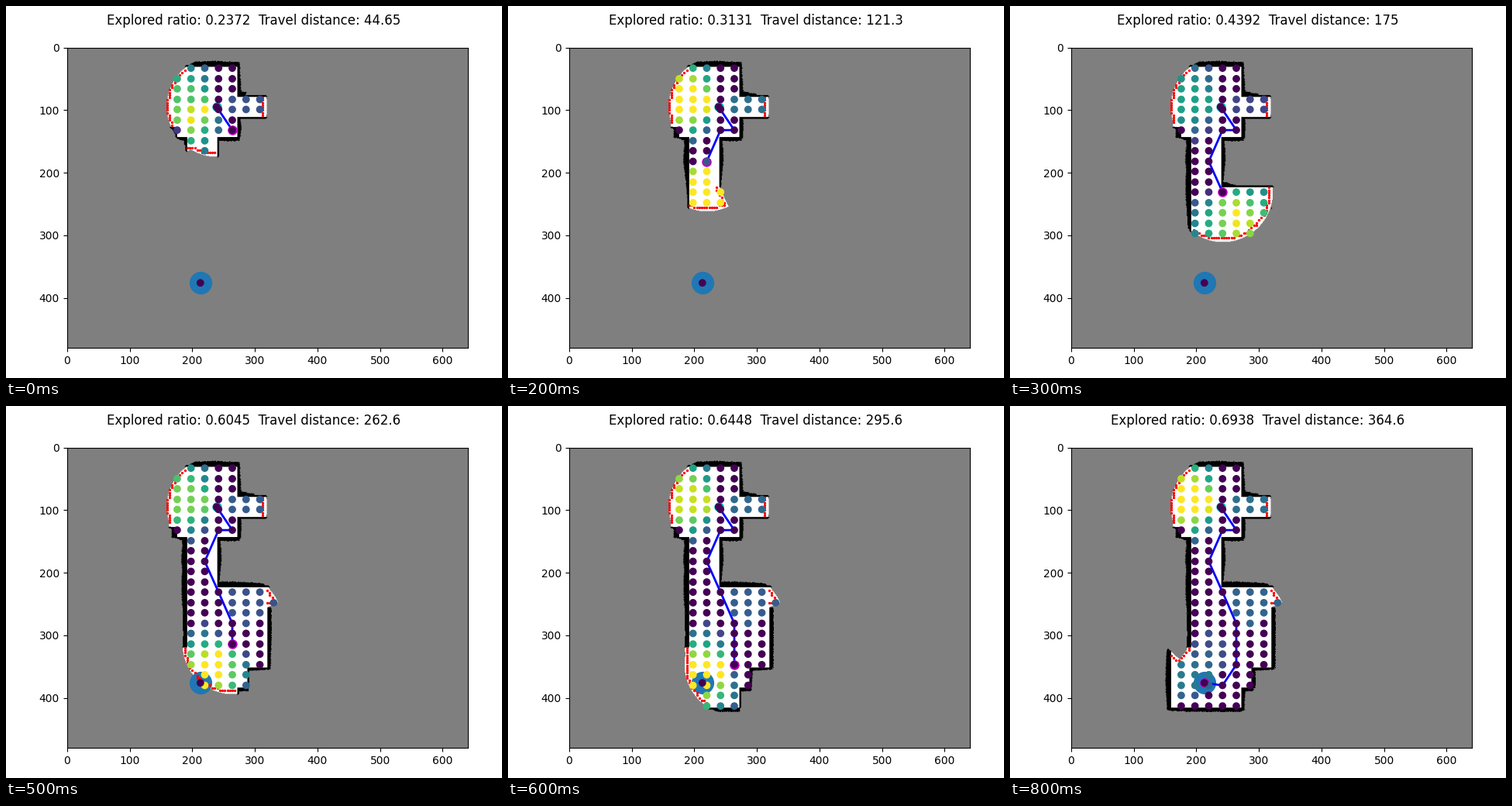
A matplotlib script that plays this animation: 640 by 480 pixels, repeating every 900 ms.

```python
import numpy as np
import matplotlib.pyplot as plt
from matplotlib.animation import FuncAnimation

W, H = 640, 480
UNKNOWN, FREE, WALL = 127, 255, 0
RANGE = 80           # sensor reach
SIGHT = 70           # reach when counting frontiers
MIN_UTILITY = 5      # fewer visible frontiers count as none
CELL = 4             # frontier grid size
TILE = 16            # floor plan grid size
START, GOAL = (239, 95), (213, 376)

# rooms as left, top, right, bottom in tiles
ROOMS = [(9, 2, 17, 8), (11, 2, 17, 9), (17, 5, 21, 7), (12, 9, 15, 14),
         (12, 14, 20, 22), (20, 14, 22, 16), (12, 22, 18, 24), (10, 20, 17, 26)]
# waypoints as column, row of the node grid
STOPS = [(5, 8), (4, 8), (3, 11), (4, 14), (5, 17), (5, 19), (5, 21), (4, 23)]
# explored ratio at some steps, the others follow the seen area
RATIOS = {0: 0.2372, 2: 0.3131, 3: 0.4392, 4: 0.5512, 6: 0.6448, 8: 0.6938}


def node(col, row):
    return 154 + 22 * col, int(16.5 * row + 0.5)


rng = np.random.default_rng(4)
yy, xx = np.mgrid[:H, :W]
floor = np.zeros((H, W), bool)
for x0, y0, x1, y1 in ROOMS:
    floor[y0 * TILE:y1 * TILE, x0 * TILE:x1 * TILE] = True

path = np.array([START] + [node(*s) for s in STOPS] + [GOAL])
nodes = np.array([node(c, r) for c in range(9) for r in range(2, 27)]
                 + [START, GOAL])


def grow(mask, n):
    for _ in range(n):
        out = mask.copy()
        out[1:] |= mask[:-1]
        out[:-1] |= mask[1:]
        out[:, 1:] |= mask[:, :-1]
        out[:, :-1] |= mask[:, 1:]
        mask = out
    return mask


def scan(belief, pos, blind=None):
    """Cast rays from pos and write what they reach into belief."""
    n = 1440
    ang = np.arange(n) * 2 * np.pi / n
    cos, sin = np.cos(ang), np.sin(ang)
    rad = np.arange(0, RANGE + 1, 0.5)
    px = np.rint(pos[0] + np.outer(cos, rad)).astype(int)
    py = np.rint(pos[1] + np.outer(sin, rad)).astype(int)
    stop = ~floor[py, px]
    hit = np.where(stop.any(1), rad[stop.argmax(1)], RANGE)
    # walls look thicker towards the upper left
    depth = hit + 7.4 - 1.2 * (cos + sin) + rng.uniform(-0.7, 0.7, n)

    dx, dy = xx - pos[0], yy - pos[1]
    dist, theta = np.hypot(dx, dy), np.arctan2(dy, dx)
    ray = np.rint(theta * n / (2 * np.pi)).astype(int) % n
    near = dist < RANGE
    if blind:
        deg = np.degrees(theta)
        near &= ~((deg > blind[0]) & (deg < blind[1]))
    free = near & floor & (dist < hit[ray] + 1.5)
    wall = near & ~floor & (dist < depth[ray])
    wall |= grow(free, 3) & ~floor
    belief[free] = FREE
    belief[wall] = WALL


def find_frontiers(belief):
    small = belief.reshape(H // CELL, CELL, W // CELL, CELL).min((1, 3))
    pad = np.pad((small == UNKNOWN).astype(int), 1)
    h, w = small.shape
    count = sum(pad[i:i + h, j:j + w] for i in range(3) for j in range(3)
                if (i, j) != (1, 1))
    fy, fx = np.nonzero((small == FREE) & (count > 1) & (count < 8))
    return np.column_stack([fx, fy]) * CELL


def count_visible(belief, pts, fronts):
    t = np.linspace(0, 1, 72)[:, None, None, None]
    line = np.rint(pts[:, None] * (1 - t) + fronts * t).astype(int)
    clear = (belief[line[..., 1], line[..., 0]] == FREE).all(0)
    dist = np.linalg.norm(pts[:, None] - fronts, axis=2)
    total = (clear & (dist < SIGHT)).sum(1)
    return np.where(total < MIN_UTILITY, 0, total)


def explore():
    belief = np.full((H, W), UNKNOWN, np.uint8)
    scan(belief, path[0])
    done = np.zeros(len(nodes), bool)
    done[-1] = True
    steps = []
    for pos in path[1:]:
        scan(belief, pos, (-137, -60) if tuple(pos) == GOAL else None)
        known = belief[nodes[:, 1], nodes[:, 0]] == FREE
        known[-1] = True
        fronts = find_frontiers(belief)
        util = count_visible(belief, nodes, fronts)
        done |= known & (util == 0)   # a used-up node stays used up
        util[done] = 0
        steps.append((belief.copy(), nodes[known], util[known], fronts))
    return steps


steps = explore()
area = [(s[0] == FREE).sum() for s in steps]
explored = np.interp(area, [area[i] for i in RATIOS], list(RATIOS.values()))
travel = np.cumsum(np.linalg.norm(np.diff(path, axis=0), axis=1))

fig, ax = plt.subplots(figsize=(6.4, 4.8), dpi=100)
image = ax.imshow(steps[0][0], cmap="gray", vmin=0, vmax=255)
ax.axis((0, W, H, 0))
ax.scatter(*GOAL, s=400, c="C0", zorder=1)
node_dots = ax.scatter([0], [0], c=[0], cmap="viridis", zorder=5)
front_dots = ax.scatter([0], [0], c="r", s=2, zorder=3)
route, = ax.plot([], [], "b", linewidth=2)
robot, = ax.plot([], [], "mo", markersize=8)
ax.plot(*START, "co", markersize=8)
title = fig.suptitle("Explored ratio: 0  Travel distance: 0")
fig.tight_layout()


def draw(i):
    belief, pts, util, fronts = steps[i]
    image.set_data(belief)
    node_dots.set_offsets(pts)
    node_dots.set_array(util)
    node_dots.set_clim(0, util.max())
    front_dots.set_offsets(fronts)
    route.set_data(*path[:i + 2].T)
    robot.set_data(*path[i + 1:i + 2].T)
    title.set_text(f"Explored ratio: {explored[i]:.4g}  "
                   f"Travel distance: {travel[i]:.4g}")
    return image, node_dots, front_dots, route, robot, title


anim = FuncAnimation(fig, draw, frames=len(steps), interval=100, repeat=True)
plt.show()
```
